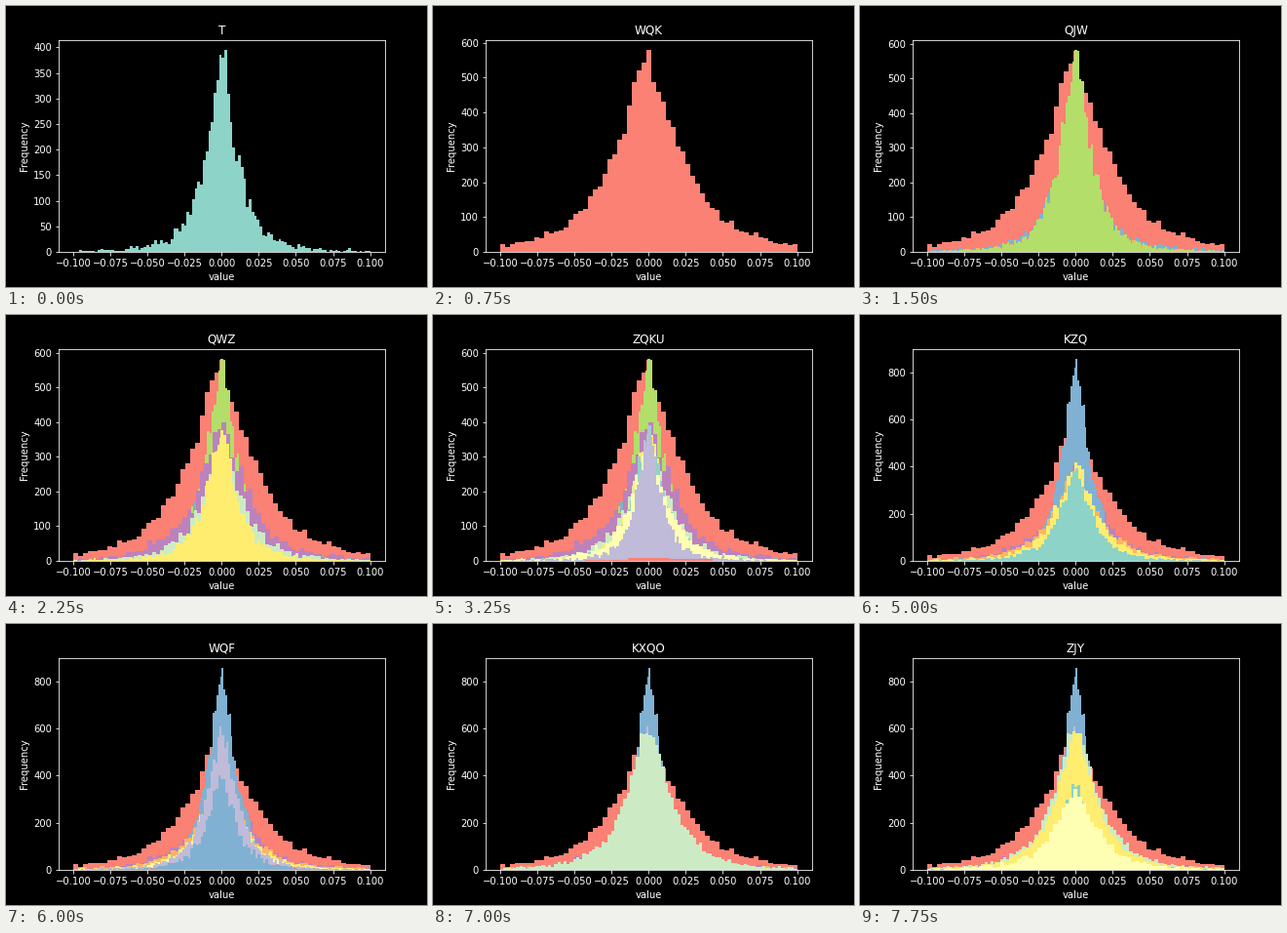
A matplotlib script that plays this animation: 432x288 px, repeating every 8000 ms.

```python
import numpy as np
import matplotlib.pyplot as plt
from matplotlib.animation import FuncAnimation

plt.style.use("dark_background")
COLORS = ["#8dd3c7", "#feffb3", "#bfbbd9", "#fa8174", "#81b1d2",
          "#fdb462", "#b3de69", "#bc82bd", "#ccebc4", "#ffed6f"]
LABELS = """T QKZ JXQ WQK ZVQ KJQ QJW XZQ JQVK QWZ ZKJ VQX XJK ZQKU KQW QZJ
            WXQ JQD ZJQ QXVK KZQ XQW JZK VKQ WQF QJX ZXK JWQ KXQO QVZ XKJ
            ZJY""".split()
LIMIT = 0.1

# (peak, spread) of the series that stand out; the rest are drawn at random
SHAPES = {
    0: (395, .0225), 3: (580, .049), 4: (360, .031), 6: (583, .023),
    7: (400, .037), 8: (355, .030), 11: (340, .028), 12: (390, .0185),
    13: (8, .050), 14: (858, .022), 15: (375, .036), 17: (415, .021),
    19: (420, .030), 21: (400, .026), 22: (610, .023), 23: (380, .018),
    24: (400, .021), 28: (582, .032), 29: (588, .031), 31: (345, .032),
}


def histogram(i):
    """Counts and edges of a peaked, heavy-tailed sample."""
    rng = np.random.default_rng(i)
    peak, spread = SHAPES.get(i, (rng.integers(360, 400),
                                  rng.uniform(.022, .026)))
    # larger and narrower samples get finer bins
    bins = round(.125 * np.sqrt(peak) / spread)
    edges = np.linspace(-LIMIT, LIMIT, bins + 1)
    mid = (edges[1:] + edges[:-1]) / 2
    bell = peak / (1 + np.abs(mid / spread) ** 1.5) ** 2.5
    counts = rng.poisson(bell)
    return np.round(counts * peak / counts.max()), edges


fig, ax = plt.subplots(figsize=(6, 4), dpi=72)
fig.subplots_adjust(left=.125, right=.9, bottom=.125, top=.88)
ax.set(xlim=(-1.1 * LIMIT, 1.1 * LIMIT), xlabel="value", ylabel="Frequency")

layers, peaks = [], []
for i in range(len(LABELS)):
    counts, edges = histogram(i)
    layers.append(ax.stairs(counts, edges, fill=True, lw=0, zorder=1 + i / 100,
                            color=COLORS[i % len(COLORS)]))
    peaks.append(counts.max())
tops = 1.05 * np.maximum.accumulate(peaks)


def update(k):
    for i, layer in enumerate(layers):
        layer.set_visible(i <= k)
    ax.set_ylim(0, tops[k])
    ax.set_title(LABELS[k])
    return layers


anim = FuncAnimation(fig, update, frames=len(LABELS), interval=250,
                     init_func=lambda: update(0), repeat=True, repeat_delay=0)
plt.show()
```
